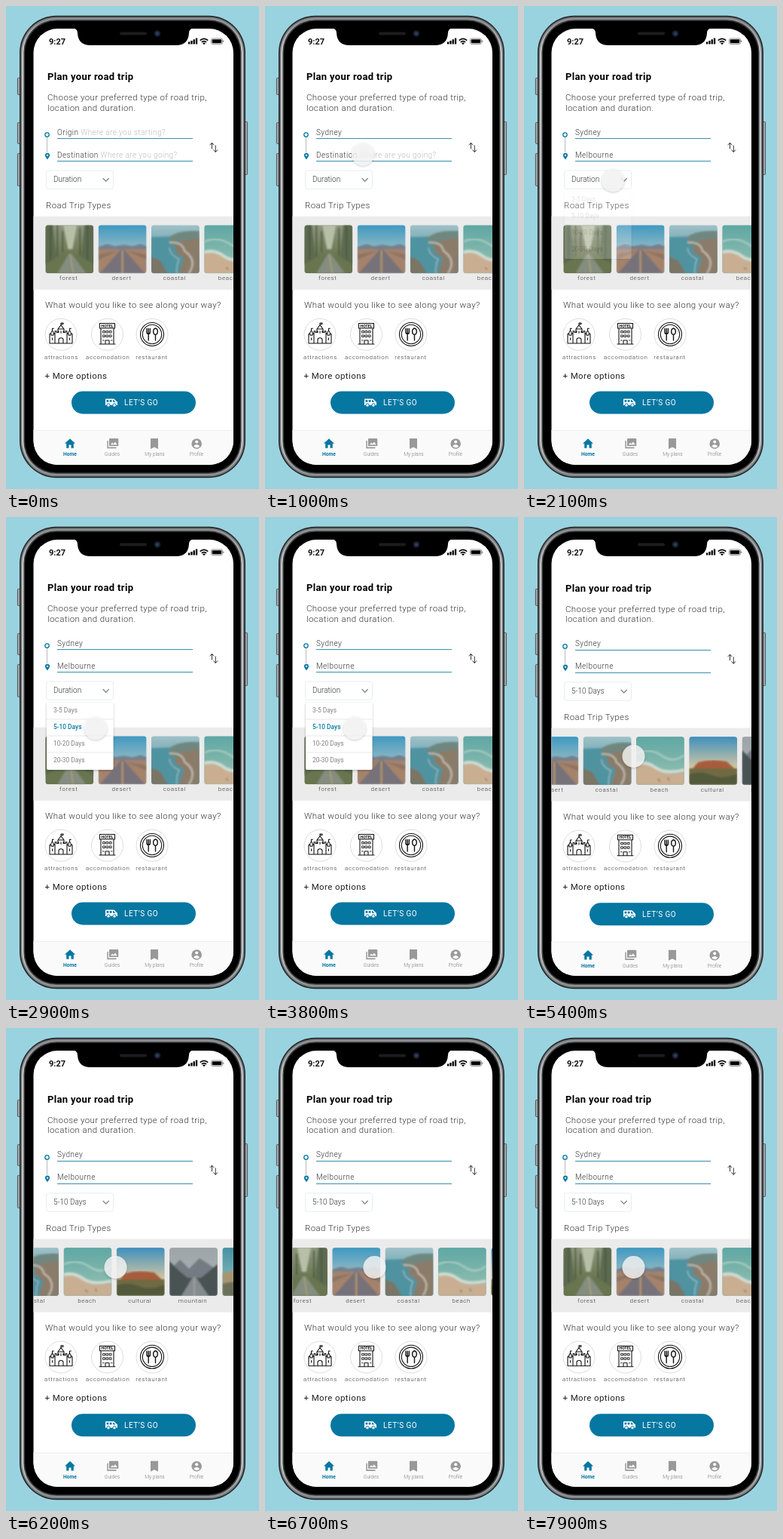
Recreate the animation shown at these times as an HTML page. Size 336x640 px, loop 8 s.

```html
<!DOCTYPE html>
<html lang="en">
<head>
<meta charset="utf-8">
<title>Road trip planner</title>
<style>
html, body { margin: 0; width: 100%; height: 100%; overflow: hidden; background: #9ad3e0; }
svg { display: block; width: 336px; height: 640px; }
text { font: 300 10px Roboto, sans-serif; fill: #333; white-space: pre; }
.title { font-weight: 700; font-size: 13px; letter-spacing: .35px; fill: #000; }
.body { font-size: 11.5px; letter-spacing: .39px; }
.more { font-weight: 400; font-size: 11.5px; letter-spacing: .4px; fill: #222; }
.field { letter-spacing: .45px; }
.hint { letter-spacing: .4px; fill: #bbb; }
.label { font-size: 8px; letter-spacing: .65px; fill: #333; text-anchor: middle; }
.option { font-size: 8.4px; font-weight: 400; fill: #808080; }
.tab { font-size: 6.7px; fill: #777; text-anchor: middle; }
.hotel { font-size: 5.2px; font-weight: 700; fill: #111; text-anchor: middle; }
.teal { fill: #0577a1; }
.line { fill: none; stroke: #111; stroke-width: 1.1; stroke-linejoin: round; stroke-linecap: round; }
</style>
</head>
<body>
<svg viewBox="0 0 336 640">
  <defs>
    <clipPath id="screen"><rect x="36.5" y="30" width="265.5" height="578" rx="32"/></clipPath>
    <clipPath id="card"><rect width="64" height="64" rx="4"/></clipPath>
    <linearGradient id="steel" x2="0" y2="1">
      <stop stop-color="#8d9092"/><stop offset=".08" stop-color="#c9cccd"/>
      <stop offset=".92" stop-color="#c9cccd"/><stop offset="1" stop-color="#8d9092"/>
    </linearGradient>
    <filter id="soft" x="0" y="0" width="1" height="1"><feGaussianBlur stdDeviation=".9"/></filter>
    <filter id="shadow" x="-40%" y="-40%" width="180%" height="180%">
      <feDropShadow dx="0" dy="1" stdDeviation="1.5" flood-opacity=".28"/>
    </filter>
  </defs>

  <!-- phone -->
  <g fill="#a3a8ab" stroke="#3b3f42" stroke-width=".8">
    <rect x="15.4" y="95.4" width="4" height="22" rx="1"/><rect x="15.4" y="154.4" width="4" height="28" rx="1"/>
    <rect x="15.4" y="195.4" width="4" height="43" rx="1"/><rect x="316.6" y="153.4" width="4" height="70" rx="1"/>
  </g>
  <rect x="18" y="12.8" width="300" height="612.4" rx="49" fill="#26282a"/>
  <rect x="19.6" y="14.4" width="296.8" height="609.2" rx="47.4" fill="#777b7e"/>
  <rect x="21.2" y="16" width="293.6" height="606" rx="45.8" fill="url(#steel)"/>
  <rect x="23.4" y="18.2" width="289.2" height="601.6" rx="43.6" fill="#3a3c3e"/>
  <rect x="25" y="19.8" width="286" height="598.4" rx="42" fill="#000"/>

  <g clip-path="url(#screen)">
    <rect x="36" y="30" width="267" height="579" fill="#fff"/>
    <g id="page">
      <text class="title" x="55" y="98">Plan your road trip</text>
      <text class="body" x="55" y="125">Choose your preferred type of road trip,</text>
      <text class="body" x="55" y="138.5">location and duration.</text>

      <path d="M54.5 174V194" stroke="#aaa" stroke-width=".8"/>
      <circle cx="54.5" cy="170.6" r="2.7" fill="#fff" stroke="#0577a1" stroke-width="1.3"/>
      <path class="teal" fill-rule="evenodd" d="M55 203.5C52.5 200 52 199 52 197.8a3 3 0 0 1 6 0C58 199 57.5 200 55 203.5ZM55 196.6a1.2 1.2 0 1 0 .01 0Z"/>
      <path d="M68 175.6H248M68 205.6H248" stroke="#2e8ba8"/>
      <text id="emptyOrigin" class="field" x="68" y="170.6">Origin <tspan class="hint">Where are you starting?</tspan></text>
      <text id="emptyDest" class="field" x="68" y="200.6">Destination <tspan class="hint">Where are you going?</tspan></text>
      <text id="origin" class="field" x="68" y="170.6">Sydney</text>
      <text id="dest" class="field" x="68" y="200.6">Melbourne</text>
      <path class="line" style="stroke:#333;stroke-width:1" d="M273.5 189V181.5M271 184L273.5 181.3L276 184M278.3 185V193.3M275.8 190.8L278.3 193.5L280.8 190.8"/>

      <rect x="53.5" y="218" width="89" height="24.3" rx="3" fill="#fff" stroke="#e6eef0"/>
      <text id="duration" x="63" y="233.3">Duration</text>
      <text id="chosen" x="63" y="233.3">5-10 Days</text>
      <path class="line" style="stroke:#888;stroke-width:1.3" d="M129 228.5L132.7 232.2L136.4 228.5"/>

      <text class="body" x="53" y="267.8">Road Trip Types</text>
      <rect x="36" y="278.8" width="267" height="97" fill="#ebebeb"/>
      <g id="cards"></g>

      <text class="body" x="52" y="399.8">What would you like to see along your way?</text>
      <g fill="#fff" stroke="#d9d9d9" stroke-width=".9">
        <circle cx="73" cy="435.3" r="21"/><circle cx="134.5" cy="435.3" r="21"/><circle cx="194" cy="435.3" r="21"/>
      </g>
      <g class="line">
        <path transform="translate(0 44.7) scale(1 .9)" d="M58 447V433h2v2h3v-2h2v14M81 447V433h2v2h3v-2h2v14M65 437V429h2v2h3v-2M76 429v2h3v-2h2v8M69 431V426h8v5M58 447H88M70 447v-5a3 3 0 0 1 6 0v5M59 433l2.5-5 2.5 5M82 433l2.5-5 2.5 5M69 426l4-6 4 6M73 420v-3h3v1.6h-3M61.5 428v-3h2M84.5 428v-3h2M61.5 439v3M84.5 439v3M73 429v3"/>
        <path d="M126 448V427h17v21M124 448H145M124.5 420.5h20v6.5h-20ZM132 448v-5h5v5"/>
        <path stroke-width=".9" d="M129 430.5h2.5v2.5H129ZM133.3 430.5h2.5v2.5h-2.5ZM137.6 430.5h2.5v2.5h-2.5ZM129 436h2.5v2.5H129ZM133.3 436h2.5v2.5h-2.5ZM137.6 436h2.5v2.5h-2.5ZM128.5 443h1.5M139.5 443h1.5"/>
        <circle cx="194" cy="435" r="15.5"/><circle cx="194" cy="435" r="12.7"/>
        <path stroke-width="1.4" d="M187 427.5v4.5q0 2.5 2.2 2.5t2.2-2.5v-4.5M189.2 427.5V443M198.5 427c-4 1-3.5 8 0 8.5c3.5-.5 4-7.5 0-8.5ZM198.5 435.5V443"/>
      </g>
      <text class="hotel" x="134.5" y="425.6">HOTEL</text>
      <text class="label" x="73.5" y="467.5">attractions</text>
      <text class="label" x="135.3" y="467.5">accomodation</text>
      <text class="label" x="193.5" y="467.5">restaurant</text>
      <text class="more" x="51.5" y="493.7">+ More options</text>

      <rect class="teal" x="87" y="510.5" width="165" height="30" rx="15"/>
      <path fill="#fff" fill-rule="evenodd" d="M133 520.5H143.5L148 525V529H132V521.5Q132 520.5 133 520.5ZM133.5 522V524.8H136.3V522ZM137.7 522V524.8H140.5V522ZM142 522V524.8H145.5L142.9 522Z"/>
      <g fill="#fff" stroke="#0577a1"><circle cx="136" cy="529" r="2.2"/><circle cx="144" cy="529" r="2.2"/></g>
      <text x="157" y="529.2" style="fill:#fff;font-weight:400;letter-spacing:.5px">LET’S GO</text>

      <rect x="36" y="562" width="267" height="47" fill="#fafafa"/>
      <path d="M36 562.3H303" stroke="#ececec"/>
      <path class="teal" d="M85 573.3L78 579.8H80.2V585.8H83.5V581.6H86.5V585.8H89.8V579.8H92Z"/>
      <g fill="#999">
        <path fill-rule="evenodd" d="M138 573H148Q149.3 573 149.3 574.3V583H137V574Q137 573 138 573ZM138.8 581.3H147.8L145 577.5L142.7 580.3L141.2 578.4Z"/>
        <path d="M134.3 576H135.8V584.5H146.5V586.2H134.3Z"/>
        <path d="M192 573H202V587L197 584.5L192 587Z"/>
        <circle cx="253.2" cy="580" r="6.8"/>
      </g>
      <g fill="#fafafa"><circle cx="253.2" cy="577.5" r="2.1"/><path d="M249 583.2Q253.2 579 257.4 583.2Q253.2 587.5 249 583.2Z"/></g>
      <text class="tab" style="font-weight:700;fill:#0577a1" x="85" y="596.3">Home</text>
      <text class="tab" x="141" y="596.3">Guides</text>
      <text class="tab" x="197.5" y="596.3">My plans</text>
      <text class="tab" x="253" y="596.3">Profile</text>
    </g>

    <g id="menu">
      <rect x="54" y="246" width="88.5" height="89" rx="2" fill="#fff" filter="url(#shadow)"/>
      <path d="M54 268H142M54 290H142M54 312H142" stroke="#e4e4e4" stroke-width=".8"/>
      <text class="option" x="63" y="259">3-5 Days</text>
      <text id="plain" class="option" x="63" y="281">5-10 Days</text>
      <text id="picked" class="option" style="fill:#0577a1;font-weight:500" x="63" y="281">5-10 Days</text>
      <text class="option" x="63" y="303.3">10-20 Days</text>
      <text class="option" x="63" y="324.5">20-30 Days</text>
    </g>
    <g id="pointer"><circle r="15" fill="#f6f6f6" fill-opacity=".8" filter="url(#shadow)"/></g>
  </g>

  <!-- notch and status bar -->
  <path d="M89 29.5Q95 30 95 36Q96 52 112 52H226Q242 52 243 36Q243 30 249 29.5Z"/>
  <rect x="151" y="34.5" width="36" height="4" rx="2" fill="#1c1c1e"/>
  <circle cx="201" cy="36.5" r="4.2" fill="#1b2130"/><circle cx="201" cy="36.5" r="2" fill="#2b4264"/>
  <text x="57" y="51" style="font-size:11px;font-weight:700;fill:#111">9:27</text>
  <path d="M242 47.5h2.3v3H242ZM245.3 46h2.3v4.5h-2.3ZM248.6 44.3h2.3v6.2h-2.3ZM251.9 42.5h2.3v8h-2.3Z"/>
  <path fill="none" stroke="#000" stroke-width="1.6" d="M257.7 45.6Q263 41 268.3 45.6M259.8 47.9Q263 45.2 266.2 47.9"/>
  <path d="M261 49.3Q263 47.8 265 49.3L263 51.3Z"/>
  <rect x="272.5" y="43" width="15" height="7.5" rx="2" fill="none" stroke="#777" stroke-width=".8"/>
  <rect x="273.7" y="44.2" width="12.6" height="5.1" rx="1"/><rect x="288.3" y="45.5" width="1" height="2.5" fill="#777"/>
</svg>
<script>
const $ = id => document.getElementById(id);
const shape = (fill, d) => `<path fill="${fill}" d="${d}"/>`;
const stroke = (color, width, d) => `<path fill="none" stroke="${color}" stroke-width="${width}" d="${d}"/>`;

// name, top colour, bottom colour, flat scenery
const scenes = [
  ['forest', '#8d977e', '#68754f',
    shape('#b8bfa7', 'M24 0H42L36 32H30Z') +
    shape('#5c6a4f', 'M0 0H10L14 44L0 52ZM64 0H52L48 42L64 52Z') +
    stroke('#48533c', 1.5, 'M7 0V46M16 0V42M23 8V36M46 4V40M56 0V46') +
    shape('#858c80', 'M31 38H35L54 64H16Z') + stroke('#bdb06a', 1, 'M33 39L37 64')],
  ['desert', '#3f98c1', '#a9c3c5',
    shape('#75808c', 'M0 29L12 25L22 28L34 26L46 28L56 25L64 28V34H0Z') +
    shape('#a5826b', 'M0 32H64V64H0Z') + shape('#8d7463', 'M0 46L27 34L0 39ZM64 46L37 34L64 39Z') +
    shape('#77727a', 'M30 32H34L62 64H2Z') + stroke('#cda05b', 1.6, 'M32 33V64')],
  ['coastal', '#9fc1c8', '#5b9aa6',
    shape('#4f93a0', 'M0 16L64 14V64H0Z') + shape('#708780', 'M22 17Q36 6 64 8V30H30Z') +
    shape('#8a7b69', 'M64 17L40 21L30 34L43 44L37 64H64Z') + shape('#7a7465', 'M0 42L12 47L22 64H0Z') +
    stroke('#bdb3a6', 2.6, 'M24 23Q42 22 44 34Q62 46 50 64') + stroke('#a5bfbf', 1.2, 'M24 30Q25 40 37 45Q33 54 34 64')],
  ['beach', '#5fa7a4', '#86b9ad',
    shape('#c9ae92', 'M0 38Q14 34 26 43T64 47V64H0Z') +
    stroke('#cfdcd3', 4, 'M0 36Q14 32 26 41T64 44') + stroke('#a5cac0', 2.5, 'M0 22Q18 14 34 25T64 24') +
    stroke('#8d7966', 1.5, 'M29 56l3 3M42 54l2 4')],
  ['cultural', '#3f8fbd', '#d3c7a2',
    shape('#a85c3b', 'M5 42L12 34Q29 29 50 33L60 42Z') +
    shape('#6f6a42', 'M0 42H64V64H0Z') + shape('#535a3b', 'M0 50Q16 45 30 51T64 49V64H0Z')],
  ['mountain', '#9da4a7', '#aab1b3',
    shape('#727c82', 'M0 30L14 16L26 28L40 14L64 30V46H0Z') +
    shape('#4a5252', 'M0 18L12 30L24 40H42L64 22V64H0Z') + shape('#858b8e', 'M31 39H35L52 64H16Z') +
    stroke('#b9bab4', .9, 'M33 40V64')],
  ['lakes', '#4691a4', '#7db3b7',
    shape('#a79572', 'M0 34Q22 25 64 36V64H0Z') + shape('#6d6f58', 'M0 48Q28 40 64 52V64H0Z')]
];
const step = 70.3;
$('cards').innerHTML = scenes.map(([name, top, bottom, art], i) => `
  <linearGradient id="sky${i}" x2="0" y2="1"><stop stop-color="${top}"/><stop offset=".65" stop-color="${bottom}"/></linearGradient>
  <g transform="translate(${52.3 + step * i} 290.3)">
    <g clip-path="url(#card)"><rect width="64" height="64" fill="url(#sky${i})"/><g filter="url(#soft)">${art}</g></g>
    <text class="label" x="31" y="73">${name}</text>
  </g>`).join('');

const smooth = (t, start, end) => {
  const p = Math.min(1, Math.max(0, (t - start) / (end - start)));
  return p * p * (3 - 2 * p);
};
const show = (id, opacity) => $(id).setAttribute('opacity', opacity);
const move = (id, x, y) => $(id).setAttribute('transform', `translate(${x} ${y})`);
const swap = (from, to, p) => { show(from, 1 - p); show(to, p); };

// start, end, dx, dy
const moves = [[700, 1050, 0, 30], [1400, 1800, -12, 33], [2150, 2700, 1, 49], [4250, 4750, 26.5, 37]];

function draw(now) {
  const t = now % 8000;
  const chosen = smooth(t, 4200, 4500);
  swap('emptyOrigin', 'origin', smooth(t, 500, 750));
  swap('emptyDest', 'dest', smooth(t, 1150, 1400));
  swap('duration', 'chosen', chosen);
  swap('plain', 'picked', smooth(t, 2450, 2700));
  show('menu', smooth(t, 1980, 2400) * (1 - chosen));
  move('page', 0, .8 * chosen);
  move('cards', -3 * step * (smooth(t, 4910, 5840) - smooth(t, 6005, 6935)), 0);

  let x = 130, y = 168;
  for (const [start, end, dx, dy] of moves) {
    const p = smooth(t, start, end);
    x += dx * p;
    y += dy * p;
  }
  move('pointer', x, y);
  show('pointer', smooth(t, 150, 350));
  requestAnimationFrame(() => draw(performance.now()));
}
draw(performance.now());
</script>
</body>
</html>
```
